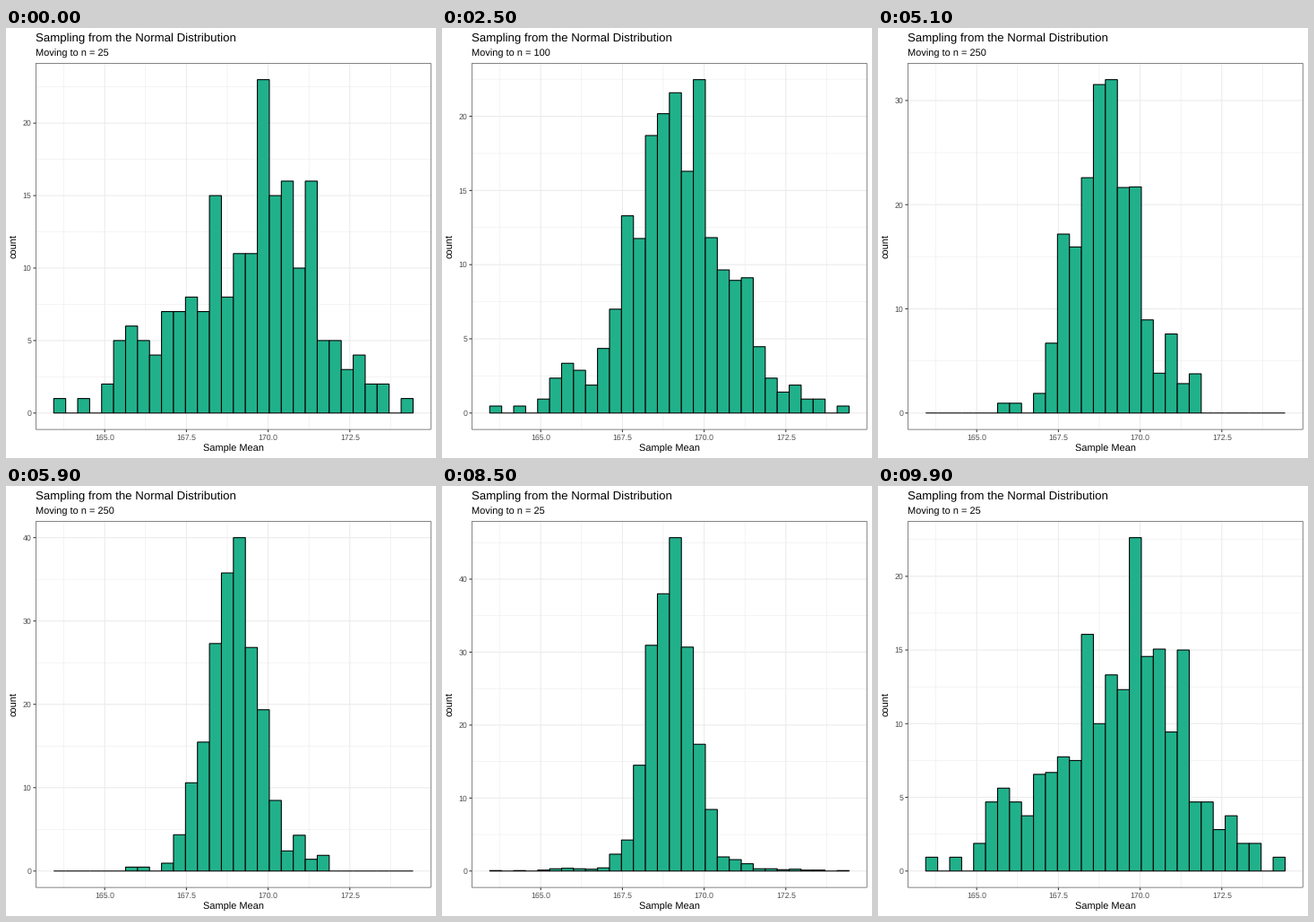
These frames come from a looping animation (480x480 px, 10000 ms). A matplotlib script:

```python
import math

import matplotlib.pyplot as plt
from matplotlib.animation import FuncAnimation
from matplotlib.collections import LineCollection
from matplotlib.patches import Rectangle

plt.rcParams.update({
    "font.family": "Liberation Sans",
    "text.hinting": "none",
    "toolbar": "None",
})

SIZE = 480
LEFT, RIGHT, TOP, BOTTOM = 33.2, 474.5, 39.05, 448.4
PAD_X, PAD_Y = (RIGHT - LEFT) / 22, (BOTTOM - TOP) / 22
BASE, PEAK = BOTTOM - PAD_Y, TOP + PAD_Y
LINE = 1.07
GRID, DARK, LABEL, FILL = "#ebebeb", "#333333", "#4d4d4d", "#20b18b"

# Histogram counts for each sample size: first bin, then the counts
BINS = 30


def counts(first, *values):
    return [0] * first + list(values) + [0] * (BINS - first - len(values))


STATES = [
    (25, counts(0, 1, 0, 1, 0, 2, 5, 6, 5, 4, 7, 7, 8, 7, 15, 8, 11, 11, 23,
                15, 16, 10, 16, 5, 5, 3, 4, 2, 2, 0, 1)),
    (100, counts(6, 1, 1, 0, 2, 7, 18, 16, 22, 31, 31, 21, 22, 9, 4, 8, 3, 4)),
    (250, counts(10, 2, 4, 15, 32, 40, 48, 32, 17, 8, 1, 1)),
]
# Start and end of each transition, in frames
MOVES = [(16, 33), (50, 67), (84, 100)]


def pose(frame):
    """Sample size in the subtitle and bar heights at a frame."""
    n, heights = STATES[0]
    for i, (start, end) in enumerate(MOVES):
        if frame > start:
            old = STATES[i][1]
            n, new = STATES[(i + 1) % len(STATES)]
            t = min(1, (frame - start) / (end - start))
            heights = [a + (b - a) * t for a, b in zip(old, new)]
    return n, heights


def nice_breaks(lo, hi, m=5):
    """Extended Wilkinson labelling, without skipped steps."""
    nice = [1, 5, 2, 2.5, 4, 3]
    span = hi - lo
    best, result = -math.inf, []
    for i, q in enumerate(nice):
        for z in (0, 1):
            step = q * 10 ** z
            for k in range(2, 12):
                first = math.floor(hi / step) - k + 1
                for s in range(first, math.ceil(lo / step) + 1):
                    a, b = s * step, (s + k - 1) * step
                    simple = 1 - i / (len(nice) - 1) - 1 + (a <= 0 <= b)
                    cover = 1 - 0.5 * ((hi - b) ** 2 + (lo - a) ** 2) / (0.1 * span) ** 2
                    r = (k - 1) / (b - a)
                    rt = (m - 1) / (max(b, hi) - min(a, lo))
                    dense = 2 - max(r / rt, rt / r)
                    score = 0.25 * simple + 0.2 * cover + 0.5 * dense + 0.05
                    if score > best:
                        best = score
                        result = [a + j * step for j in range(k)]
    return result


def across(ys, x0=LEFT, x1=RIGHT):
    return [[(x0, y), (x1, y)] for y in ys]


def upright(xs, y0=TOP, y1=BOTTOM):
    return [[(x, y0), (x, y1)] for x in xs]


fig = plt.figure(figsize=(SIZE / 72, SIZE / 72), dpi=72, facecolor="white")
ax = fig.add_axes([0, 0, 1, 1])
ax.set_xlim(0, SIZE)
ax.set_ylim(SIZE, 0)
ax.axis("off")


def add_lines(segments, color, width, z):
    lines = LineCollection(segments, colors=color, linewidths=width, zorder=z)
    lines.set_snap(False)
    lines.set_capstyle("butt")
    return ax.add_collection(lines, autolim=False)


def add_text(x, y, text, size, color="black", **kw):
    return ax.text(x, y, text, fontsize=size, color=color, zorder=6,
                   **{"va": "baseline", **kw})


def add_rect(x, y, w, h, **kw):
    rect = Rectangle((x, y), w, h, joinstyle="miter", **kw)
    rect.set_snap(False)
    return ax.add_patch(rect)


# Fixed parts
x_major = [110.2 + 91.2 * i for i in range(4)]
x_minor = [64.6 + 91.2 * i for i in range(5)]
add_lines(upright(x_minor), GRID, LINE / 2, 1)
add_lines(upright(x_major), GRID, LINE, 2)
add_lines(upright(x_major, BOTTOM, BOTTOM + 2.75), DARK, LINE, 5)
for i, x in enumerate(x_major):
    add_text(x, 459.8, f"{165 + 2.5 * i:.1f}", 8.8, LABEL, ha="center")

edge = 0.6
add_rect(LEFT + edge / 2, TOP + edge / 2, RIGHT - LEFT - edge,
         BOTTOM - TOP - edge, fill=False, ec=DARK, lw=edge, zorder=4)

add_text(LEFT, 15, "Sampling from the Normal Distribution", 13.2)
add_text((LEFT + RIGHT) / 2, 472.6, "Sample Mean", 11, ha="center")
add_text(13.4, (TOP + BOTTOM) / 2, "count", 11, rotation=90,
         ha="right", va="center")

# Moving parts
subtitle = add_text(LEFT, 31.8, "", 11)
y_minor = add_lines([], GRID, LINE / 2, 1)
y_major = add_lines([], GRID, LINE, 2)
y_ticks = add_lines([], DARK, LINE, 5)
y_labels = [add_text(28.4, 0, "", 8.8, LABEL, ha="right") for _ in range(8)]
bar_w = (RIGHT - LEFT - 2 * PAD_X) / BINS
bars = [add_rect(LEFT + PAD_X + i * bar_w, BASE, bar_w, 0,
                 fc=FILL, ec="black", lw=LINE, zorder=3)
        for i in range(BINS)]


def draw(frame):
    n, heights = pose(frame)
    subtitle.set_text(f"Moving to n = {n}")

    top = max(heights)
    scale = (BASE - PEAK) / top
    for bar, h in zip(bars, heights):
        bar.set_height(-h * scale)

    lo, hi = -0.05 * top, 1.05 * top
    breaks = nice_breaks(lo, hi)
    step = breaks[1] - breaks[0]
    minor = [b + step / 2 for b in breaks if lo <= b + step / 2 <= hi]
    major = [b for b in breaks if lo <= b <= hi]
    ys = [BASE - b * scale for b in major]
    y_minor.set_segments(across(BASE - b * scale for b in minor))
    y_major.set_segments(across(ys))
    y_ticks.set_segments(across(ys, LEFT - 2.75, LEFT))
    for i, label in enumerate(y_labels):
        label.set_visible(i < len(major))
        if i < len(major):
            label.set_text(f"{major[i]:g}")
            label.set_y(ys[i] + 3.2)
    return []


anim = FuncAnimation(fig, draw, frames=100, interval=100,
                     init_func=lambda: draw(0), repeat=True, repeat_delay=0)
plt.show()
```
